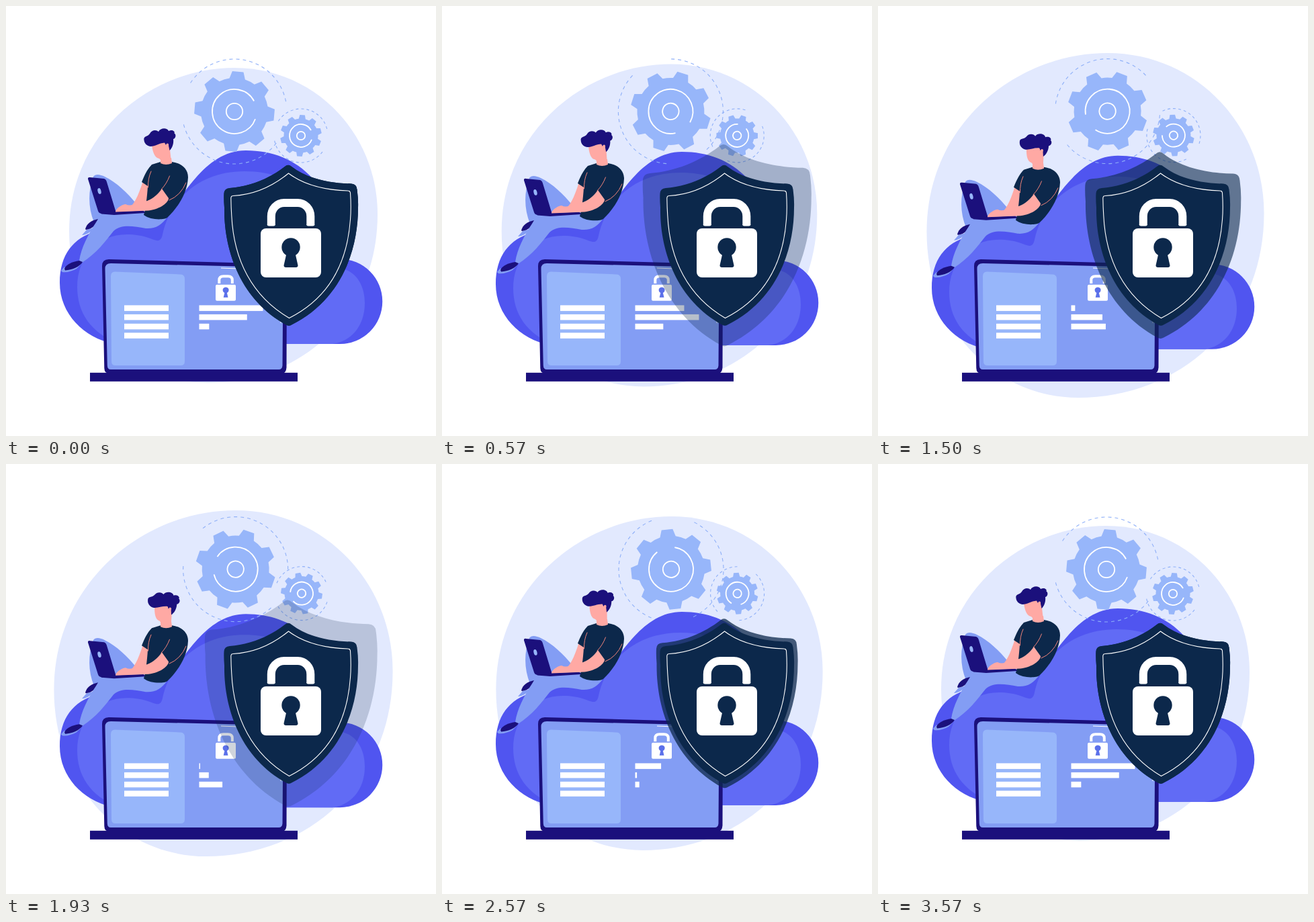
Animation of 640 by 640 pixels, one loop 3.64 s. Source, as an HTML page:

```html
<!DOCTYPE html>
<html lang="en">
<head>
<meta charset="utf-8">
<title>Cloud security</title>
<style>
html, body { margin: 0; width: 100%; height: 100%; overflow: hidden; background: #fff; }
svg { display: block; width: 100vw; height: 100vh; }
.pale { fill: #e2e9fe; }
.deep { fill: #5055f0; }
.mid { fill: #616bf5; }
.blue { fill: #839df4; }
.sky { fill: #97b6fa; }
.ink { fill: #1b107c; }
.navy { fill: #0c284b; }
.skin { fill: #ffa9a4; }
.white { fill: #fff; }
.line { fill: none; stroke: #fff; }
.seam { fill: none; stroke: #f0837a; stroke-width: 1; stroke-linecap: round; }
.dash { fill: none; stroke: #8fb0f8; stroke-width: 1.1; }
</style>
</head>
<body>
<svg viewBox="0 0 640 640">
  <defs>
    <path id="shieldShape" d="M415 239 Q420 234.500 425 239 C448 257 482 264 514 264.500 Q522 265 522.500 273 Q524.500 288 524 300 C524 365 498 438 425 474.500 Q421 477 417 474.500 C350 438 324 365 325 300 Q324 288 324.500 279 Q325 271.500 333 271 C362 269 392 257 415 239Z"/>
  </defs>

  <path id="blob" class="pale" d="M340 92 C460 92 553 190 553 310 C553 462 436 561 300 561 C190 561 94 470 94 335 C94 190 215 92 340 92Z"/>

  <g id="cloud">
    <path class="deep" d="M160 502.500 C116 494 80 458 80 412 C80 370 100 345 135 335 C170 325 200 318 225 300 C250 290 255 290 266 276 C288 247 316 215 357 215 C405 215 445 235 470 275 L490 376.500 H497 A63 63 0 0 1 497 503Z"/>
    <path class="mid" d="M170 503 C125 487 106 455 106 418 C106 375 135 340 180 340 C205 340 215 347 224 349 C230 350 232 345 233 340 C245 285 290 246 355 246 C400 246 440 262 460 300 L480 390 C515 385 534 410 534 442 C534 475 515 499 486 503Z"/>
  </g>

  <g id="gears"></g>

  <g id="person">
    <path class="blue" d="M130 254 C133 249 141 251 147 254 C165 263 180 277 196 297 L205 307 L150 312 L140 318 L131 322 C122 300 122 275 130 254Z"/>
    <path class="blue" d="M113 341 L120 333 L131 330 C126 337 119 341 113 341Z"/>
    <path class="ink" d="M118 332 C120 324 127 319 137 317 C135 325 129 332 119 333Z"/>
    <path class="skin" d="M204 260 L214 266 C214 278 213 286 210 292 L184 301 C194 290 199 276 204 260Z"/>
    <path class="blue" d="M240 314 C232 326 222 332 208 331 C190 328 172 324 160 335 C148 350 135 368 113 382 L109 379 C112 360 122 340 134 322 C138 315 143 309 155 309 L208 306Z"/>
    <path class="blue" d="M82 394 L87 388 L89 393 C100 392 108 386 112 384 L105 391 C98 395 90 397 84 396Z"/>
    <path class="ink" d="M87 391 C90 384 98 381 109 379 L114 381 C110 388 98 393 88 393.500Z"/>
    <path class="navy" d="M217 236 L230 232 Q238 238 247 232 C262 234 271 243 271 255 C270 278 256 300 240 315 C235 318.500 215 319 205 311 C208 300 210 285 211 268 L202 262 C206 252 210 243 217 236Z"/>
    <path class="skin" d="M230 226 H246 L247 234 Q238 238 230 234Z"/>
    <g id="head">
      <path class="skin" d="M217 207 C218 216 221 225 226 226.500 Q230 227 231 232 L246 232 L243 205 L236 201 C230 205 223 207 217 207Z"/>
      <path class="ink" d="M205.500 200 C204 193 211 195 214 190 C217 184 224 184 227 187 C230 181 240 181 242 186 C248 183 252 187 250.500 189.500 C253.500 191 253 197 249 198 C250 205 247 212 243.500 215 L242 208 C243 204 239 203 238 207 L236 203.500 C228 204 222 209 215 209 C209 208 206 204 205.500 200Z"/>
    </g>
    <path class="ink" d="M122 257.500 Q121.500 254.500 125 255 L146 257 Q149 258 150 262 L164 308 L142 309 Q138 308.500 137 305Z"/>
    <ellipse class="sky" cx="139" cy="275.500" rx="2.500" ry="4.500" transform="rotate(-14 139 275.500)"/>
    <path class="ink" d="M141 307 L205 304.500 L207 308 L161 311 L142 309.500Z"/>
    <path class="skin" d="M232 272 L242 286 C242 292 231 302 212 304.500 L163 306.500 C163 302 171 296 178 295 C182 297 186 297 190 295 L210 290 C220 286 226 280 232 272Z"/>
    <path class="seam" d="M216 246 Q211 257 211.500 270 M243.500 253 Q239 265 231 273 M268 263 Q260 282 243 289"/>
  </g>

  <path class="ink" d="M143 387 Q143 377 153 377 L410 384 Q418 384 418 392 L417.500 538 Q417 547 410 547 H154 Q146.500 547 146.300 539Z"/>
  <path class="blue" d="M147.500 391 Q147.500 383 156 383 L405 389 Q412.500 389 412.500 396 L411.500 535 Q411 541 406 541 H156 Q151 541 150.800 535Z"/>
  <path class="sky" d="M156 402 Q156 395.500 162 395.500 L260 399.500 Q266 400 266 406 V529 Q266 535 260 535 H163 Q157 535 157 529Z"/>
  <rect class="ink" x="125" y="545.800" width="309" height="13"/>
  <path class="line" d="M320 390 L345 391 M409 467 V472"/>
  <g id="bars" class="white"></g>
  <rect class="white" x="312" y="414.800" width="30" height="24" rx="2"/>
  <path class="line" stroke-width="4" d="M317.300 413 V408 Q317.300 402.300 323.500 402.300 H330.500 Q336.800 402.300 336.800 408 V413"/>
  <path fill="#5b70ea" d="M325.300 427 A4.500 4.500 0 1 1 328.900 427 L330.500 433.700 H323.700Z"/>

  <use id="ghost" href="#shieldShape" class="navy"/>
  <use href="#shieldShape" class="navy"/>
  <path class="line" stroke-width="1.100" d="M420.500 249 C443 266 475 274 509 275 Q512 275 512.500 278 Q514 300 512.500 318 C508 380 482 434 421.500 464.500 C366 432 339 378 335.800 312 Q335 300 334.800 286 Q335 282.500 338 282.500 C368 281 396 269 420.500 249Z"/>
  <rect class="white" x="379" y="331" width="90" height="73" rx="8"/>
  <path class="line" stroke-width="12" d="M394.800 326 V313 C394.800 302 403 293 414 293 H434 C445 293 453.300 302 453.300 313 V326"/>
  <path class="white" d="M388.800 325 H400.800 Q400.800 327.500 398 327.500 H391.500 Q388.800 327.500 388.800 325Z M447.300 325 H459.300 Q459.300 327.500 456.500 327.500 H450 Q447.300 327.500 447.300 325Z"/>
  <circle class="navy" cx="424" cy="359" r="13.700"/>
  <path class="navy" d="M418 366 H430 L434.500 386 Q434.500 389 431.500 389 H416.500 Q413.500 389 413.500 386Z"/>
</svg>
<script>
const LOOP = 3640, STEP = 1000 / 14, STEPS = 50;
const $ = id => document.getElementById(id);

function add(parent, name, attrs) {
  const el = document.createElementNS('http://www.w3.org/2000/svg', name);
  for (const key in attrs) el.setAttribute(key, attrs[key]);
  return parent.appendChild(el);
}

function set(el, transform) {
  el.setAttribute('transform', transform);
}

// Angles run clockwise from the right, in degrees.
function polar(r, deg) {
  const a = deg * Math.PI / 180;
  return (r * Math.cos(a)).toFixed(2) + ' ' + (r * Math.sin(a)).toFixed(2);
}

function arc(r, from, to) {
  const large = to - from > 180 ? 1 : 0;
  return `M${polar(r, from)}A${r} ${r} 0 ${large} 1 ${polar(r, to)}`;
}

function gearPath(teeth, inner, outer, start, base, tip) {
  const points = [];
  for (let i = 0; i < teeth; i++) {
    const a = start + i * 360 / teeth;
    const next = a + 360 / teeth - base;
    points.push(polar(inner, a - base) + 'L' + polar(outer, a - tip) +
      'L' + polar(outer, a + tip) + 'L' + polar(inner, a + base) +
      `A${inner} ${inner} 0 0 1 ${polar(inner, next)}`);
  }
  return 'M' + points.join('L') + 'Z';
}

function makeGear(o) {
  const place = add($('gears'), 'g', {});
  const spin = add(place, 'g', {});
  add(spin, 'path', { class: 'dash', 'stroke-dasharray': o.dash, d: arc(o.ring, 37, 169) + arc(o.ring, 213, 351) });
  add(spin, 'path', { class: 'sky', d: gearPath(o.teeth, o.inner, o.outer, o.start, o.base, o.tip) });
  add(spin, 'path', { class: 'line', 'stroke-width': 1.8, d: arc(o.arc, 20, 332) });
  add(spin, 'circle', { class: 'line', 'stroke-width': 1.8, r: o.hub });
  return { ...o, place, spin };
}

const gears = [
  makeGear({ x: 340, y: 157, drift: 1.7, dir: 1, teeth: 8, inner: 50, outer: 60, start: -85, base: 13.5, tip: 8, ring: 78, arc: 33, hub: 12.2, dash: '5 5' }),
  makeGear({ x: 439, y: 193, drift: 1, dir: -1, teeth: 10, inner: 25.5, outer: 31, start: -86, base: 11.5, tip: 7, ring: 40, arc: 17, hub: 6.2, dash: '4 4' })
];

const rows = [445.4, 458.9, 472.8];
[...rows, 486.3].forEach(y => add($('bars'), 'rect', { x: 176, y, width: 66, height: 8.5 }));
const bars = [[95, 0], [95, 60], [56, 118]].map(([size, shift], i) => ({
  size, shift, el: add($('bars'), 'rect', { x: 287.5, y: rows[i], height: 8.5 })
}));

// Pulse stops: progress, growth, opacity.
const pulse = [[0, 0, 1], [0.16, 0.055, 0.75], [0.26, 0.162, 0.6], [0.47, 0.255, 0.3], [0.622, 0.286, 0.19], [1, 0.31, 0]];

function pulseAt(p) {
  const i = pulse.findIndex(stop => stop[0] > p);
  const a = pulse[i - 1], b = pulse[i];
  const k = (p - a[0]) / (b[0] - a[0]);
  return [1, 2].map(n => a[n] + (b[n] - a[n]) * k);
}

function scaleAt(x, y, k) {
  return `translate(${x} ${y}) scale(${k}) translate(${-x} ${-y})`;
}

function draw(ms) {
  const n = Math.min(STEPS, Math.floor((ms % LOOP + 4.4) / STEP));
  const u = n % STEPS / STEPS;
  const turn = 360 * u;
  const sway = (1 - Math.cos(2 * Math.PI * u)) / 2;

  set($('blob'), scaleAt(323.5, 326.5, 1 + 0.1 * sway));
  set($('cloud'), `translate(0 ${8.3 * sway})`);
  set($('person'), `translate(0 ${8.3 * sway})`);
  set($('head'), `rotate(${10 * sway} 237 230)`);

  for (const g of gears) {
    set(g.place, `translate(${g.x + g.drift * sway} ${g.y - 0.4 * sway})`);
    set(g.spin, `rotate(${g.dir * turn})`);
  }
  for (const b of bars) {
    const wave = (1 + Math.cos((turn - b.shift) * Math.PI / 180)) / 2;
    b.el.setAttribute('width', (b.size * wave).toFixed(2));
  }

  const [grow, alpha] = pulseAt(u * 3 % 1);
  set($('ghost'), scaleAt(424, 356.5, 1 + grow));
  $('ghost').setAttribute('opacity', alpha);
}

function tick() {
  draw(performance.now());
  requestAnimationFrame(tick);
}
tick();
</script>
</body>
</html>
```
